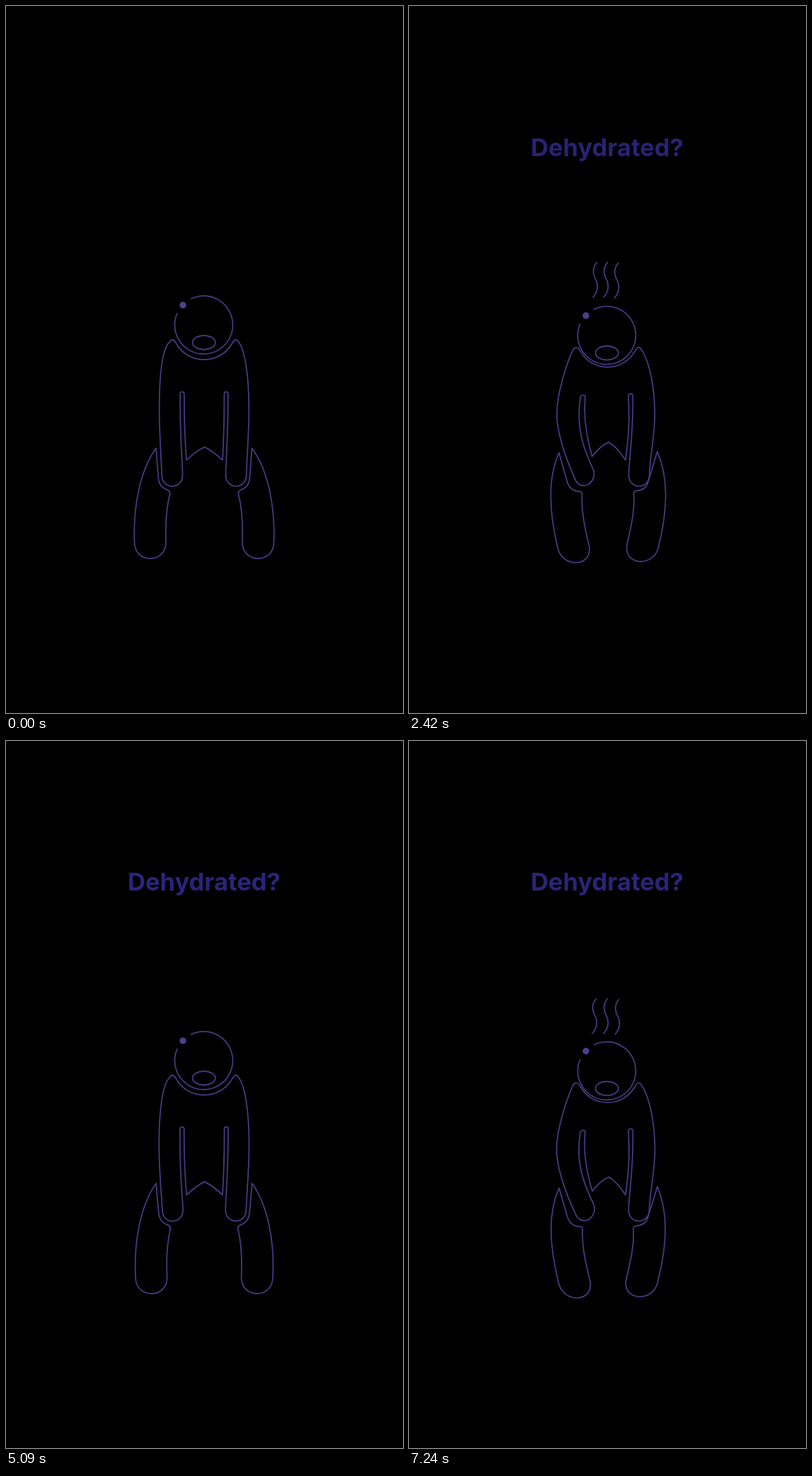
Animation of 561x998 px, one loop 7.27 s. Source, as an HTML page:

```html
<!DOCTYPE html>
<html lang="en">
<head>
<meta charset="utf-8">
<title>Dehydrated?</title>
<style>
  html, body { margin: 0; width: 100%; height: 100%; overflow: hidden; background: #000; }
  svg { display: block; width: 100%; height: 100%; }
  .line { fill: none; stroke: #473d86; stroke-width: 1.7; stroke-linejoin: round; }
  text { font: 700 34.5px Inter, sans-serif; fill: #2b247a; text-anchor: middle; }
</style>
</head>
<body>
<svg viewBox="0 0 561 998">
  <text id="title" x="280" y="211">Dehydrated?</text>
  <g class="line">
    <g id="steam"><path/><path/><path/></g>
    <g id="head">
      <path d="M261 413.6 A41 41 0 1 1 242 433.5"/>
      <ellipse cx="279.7" cy="475" rx="16.2" ry="9.8"/>
      <circle cx="250" cy="422.3" r="4.7" fill="#4b408c" stroke="none"/>
    </g>
    <path id="torso"/>
    <path id="leftLeg"/>
    <path id="rightLeg"/>
  </g>
</svg>
<script>
const LOOP = 7270, SECOND_START = 4990;
const el = id => document.getElementById(id);

// Each shape: [standing pose, slumped pose] with matching path commands.
const chest = [
  "M240 475.5 C257 507 303 507 320 475.5 Q324.5 467.5 328.5 474 C336.5 484 343.3 515 343.3 572 C343.3 600 ",
  "M242 487.5 C259 518 302 518 319.5 487.5 Q324 478 329 486.5 C340 503 347.5 540 347.5 577 C347.5 607 "];
const rightHand = [
  "340.5 635 339.7 662 C339.7 683 310.5 683 310.5 662 C310.5 645 ",
  "341 640 333.5 660 C329 681 303 680 304.7 658 C308 648 "];
const rightSlot = [
  "314 610 313.8 548 Q313.8 544.5 311 544.5 Q308.4 544.5 308.4 548 C308.4 590 307.5 615 ",
  "317.5 600 316.3 551 Q316.5 547.5 313.3 547.5 Q310 547.5 310 551 C312.5 590 309.5 615 "];
const rightHip = ["306 641 ", "305.5 636 "];
const leftSide = [
  "Q292 628 280.5 622.5 Q269 628 255 641 C253 615 251.8 590 251.8 548 Q251.8 544.5 249 544.5 Q246.2 544.5 246.2 548 C245.5 610 249.5 645 249.5 662 C249.5 683 220.5 683 220.3 663 C219 635 216.7 600 216.7 572 C216.5 515 222 482 231.5 474 Q235.5 467.5 240 475.5 Z",
  "Q293 621 282 615.5 Q271 620 259 635.5 C250 605 246 578 248.9 552.5 Q249.2 549.7 245.8 549.5 Q242.6 549.5 242 552.5 C235 595 247 625 260.5 653 C269 672 243 689 234.5 666 C220 635 208.5 600 208.5 577 C208.5 548 223 505 231.5 486.5 Q236.5 478.5 242 487.5 Z"];
const leftLeg = [
  "M212 624 C190 655 179.5 705 181.5 757 C182 788 226 787 226 757 C225 730 227.5 705 231.5 689 Q232.5 685.5 229 683.5 C219 680 215.5 674 215 663 Z",
  "M212 631 C197 665 197 708 212 767 C220 794 261 792 256 763 C248 730 244 710 245.3 689 Q245 685.5 241.5 685.3 C231 685 226.5 680 224 672 Z"];
const rightLeg = [
  "M347.5 624 C370 655 380.5 705 378.5 757 C378 788 334 787 334 757 C335 730 332.5 705 328.5 689 Q327.5 685.5 331 683.5 C341 680 344 674 344.7 663 Z",
  "M351 629 C366 665 366 708 350.5 767 C342 792 302 790 306.7 761 C314 730 318.5 710 317 689 Q317 685 320.5 684.5 C331 683.5 335 680 338 671 Z"];

const ramp = (t, from, to) => Math.min(1, Math.max(0, (t - from) / (to - from)));
const smooth = (t, from, to) => { const u = ramp(t, from, to); return u * u * (3 - 2 * u); };

function blend([a, b], amount) {
  const target = b.match(/[\d.]+/g);
  let i = 0;
  return a.replace(/[\d.]+/g, n => (+n + (target[i++] - n) * amount).toFixed(2));
}

function drawBody(t) {
  const slump = smooth(t, 0, 720) - smooth(t, 2230, 3670);
  const hand = slump * (1 - smooth(t, 1100, 2400));
  el("head").setAttribute("transform", `translate(0 ${15.5 * slump})`);
  el("torso").setAttribute("d", blend(chest, slump) + blend(rightHand, hand) +
    blend(rightSlot, slump) + blend(rightHip, hand) + blend(leftSide, slump));
  el("leftLeg").setAttribute("d", blend(leftLeg, slump));
  el("rightLeg").setAttribute("d", blend(rightLeg, slump));
}

// Steam sinks towards the head while appearing, then drifts up faster and faster.
function drawSteam(t) {
  const sink = 1 - (1 - ramp(t, 720, 1850)) ** 2;
  const rise = ramp(t, 1850, 3760) ** 2.8;
  const y = 284 + 80.5 * sink - 83 * rise;
  const spread = 14.8 + 1.3 * Math.cos(2 * Math.PI * (t - 2240) / 850);
  el("steam").setAttribute("opacity", ramp(t, 720, 950) - ramp(t, 3550, 3790));
  [...el("steam").children].forEach((strand, i) => strand.setAttribute("d",
    `M${280.8 + (i - 1) * spread} ${y + (i === 2 ? 1 : 0)} c-7 8 -6 17 -1.5 25 c3 7 3.5 16 -4.5 25`));
}

function drawTitle(t) {
  const shown = smooth(t, 1100, 2600);
  el("title").setAttribute("transform", `translate(0 ${37 * (1 - shown)})`);
  el("title").setAttribute("opacity", shown);
}

function frame() {
  const time = performance.now() % LOOP;
  const phase = time < SECOND_START ? time : time - SECOND_START;
  drawBody(phase);
  drawSteam(phase);
  drawTitle(time);
  requestAnimationFrame(frame);
}
frame();
</script>
</body>
</html>
```
